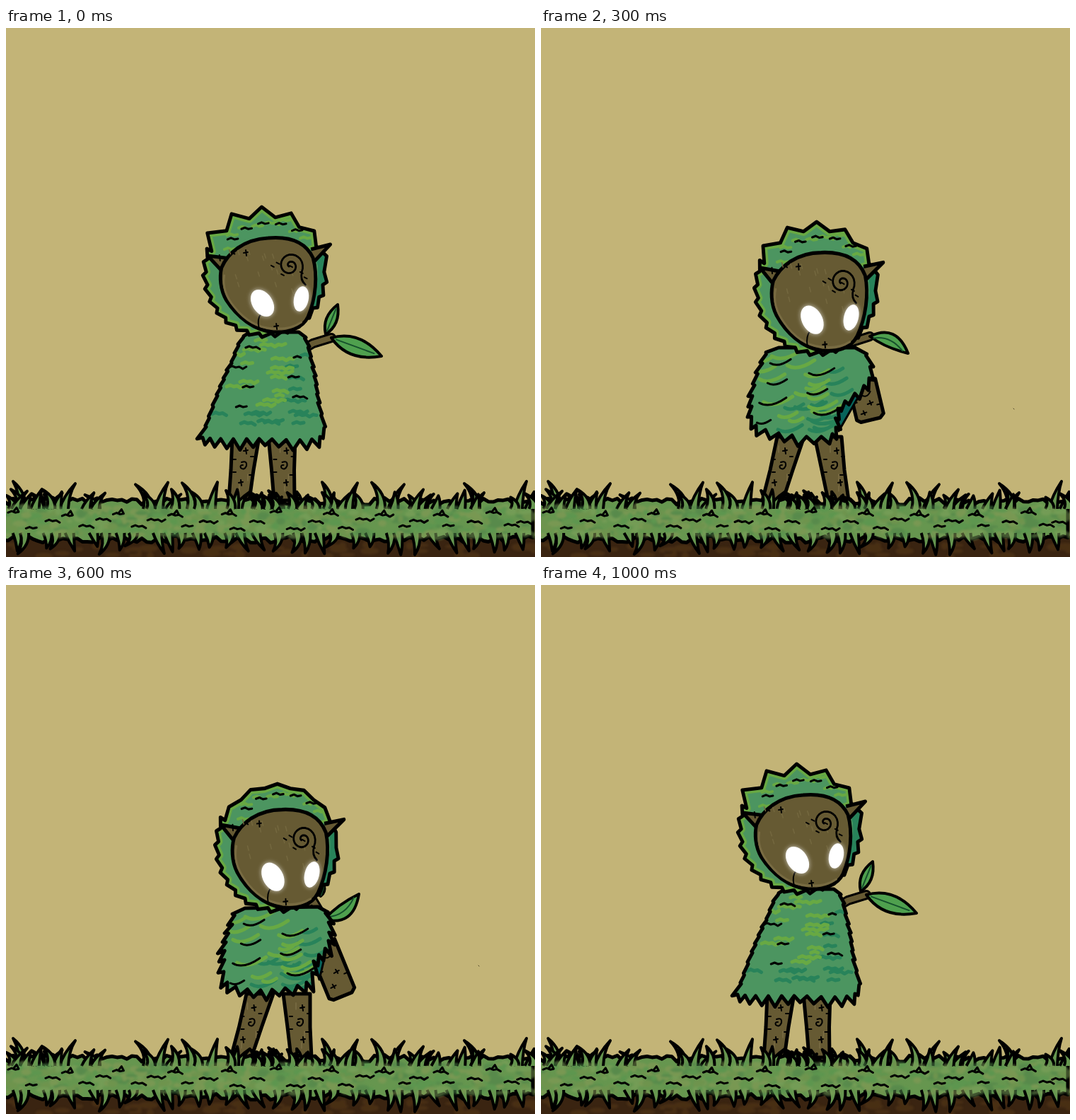
These frames come from a looping animation (748x748 px, 1.1 s). An HTML page:

```html
<!DOCTYPE html>
<html lang="en">
<head>
<meta charset="utf-8">
<title>Forest sprite</title>
<style>
html, body { margin: 0; width: 100%; height: 100%; overflow: hidden; background: #c3b477; }
svg { display: block; width: 100vw; height: 100vh; }
.ink { fill: none; stroke: #000; stroke-linecap: round; stroke-linejoin: round; }
.line { stroke: #000; stroke-linejoin: round; }
.pose { visibility: hidden; animation: show 1.1s step-end infinite; }
.rest { animation-name: rest; }
@keyframes show { 0% { visibility: visible; } 9.0909% { visibility: hidden; } }
@keyframes rest { 0% { visibility: visible; } 18.1818% { visibility: hidden; } }
</style>
</head>
<body>
<svg id="stage" viewBox="0 0 748 748"></svg>
<script>
const LIGHT = '#68a943', DARK = '#28835a', FUR = '#4c9560', BARK = '#665a33', TURF = '#66964f';

// Seeded random numbers
let seed = 1;
const rnd = (a, b) => {
  seed = (seed * 16807) % 2147483647;
  return a + (b - a) * seed / 2147483647;
};
const list = (n, f) => Array.from({ length: n }, (_, i) => f(i));
const times = (n, f) => list(n, f).join('');
const points = s => s.split(' ').map(p => p.split(',').map(Number));
const poly = p => 'M' + p.map(q => q.map(v => v.toFixed(1))).join(' ');

const stroke = (d, color = '#000', width = 2) =>
  `<path d="${d}" class="ink" style="stroke:${color};stroke-width:${width}"/>`;
const shape = (d, fill, width = 5) =>
  `<path d="${d}" class="line" fill="${fill}" stroke-width="${width}"/>`;
const cross = (x, y) => `M${x - 3},${y}l6,-1M${x},${y - 4}l1,8`;

// Ragged dash, or a windblown swoop
const dash = (x, y, w) => `M${x},${y}` + times(w / 5, i => `l5,${[-2, 2, -1, 3, -3, 1][i % 6]}`);
const swoop = (x, y, w) => `M${x},${y}q${w * .5},${w * .3} ${w * 1.3},${-w * .25}`;

let clips = 0;
const clipped = (d, fill, inner) => {
  const id = 'clip' + clips++;
  return `<clipPath id="${id}"><path d="${d}"/></clipPath><path d="${d}" fill="${fill}"/>
    <g clip-path="url(#${id})">${inner}</g>${shape(d, 'none')}`;
};

// Closed Catmull-Rom curve through p at position u
const spline = (p, u) => {
  const i = Math.floor(u), t = u - i;
  return [0, 1].map(c => {
    const [a, b, d, e] = [-1, 0, 1, 2].map(k => p[(i + k + p.length) % p.length][c]);
    return b + t / 2 * (d - a + t * (2 * a - 5 * b + 4 * d - e + t * (3 * (b - d) + e - a)));
  });
};

// Cape outline: left side down, hem, right side up, neck; teeth hang from all but the neck
const fringe = (p, tuft) => {
  const out = [];
  for (let i = 0; i < 9; i++) {
    const hem = i === 4 || i === 5, lean = hem ? .5 : i < 4 ? .75 : .2;
    const size = Math.hypot(p[i + 1][0] - p[i][0], p[i + 1][1] - p[i][1]);
    const n = Math.max(1, Math.round(size / (hem ? 17 : 14)));
    for (let k = 0; k < n; k++) {
      const u = i + (k + lean) / n;
      const [x, y] = spline(p, u), [x2, y2] = spline(p, u + .01);
      const h = Math.hypot(x2 - x, y2 - y), d = (hem ? 14 : tuft) * rnd(.6, 1.2);
      out.push(spline(p, i + k / n));
      out.push([x - (y2 - y) / h * d, y + (x2 - x) / h * d + (hem ? 0 : d * .8)]);
    }
  }
  return poly([...out, p[9]]) + 'Z';
};

const cape = (p, tuft) => {
  seed = 11;
  const d = fringe(p, tuft), mark = tuft > 5.5 ? swoop : dash;
  const cx = (p[2][0] + p[7][0]) / 2, top = p[0][1];
  const light = list(15, i => mark(cx + rnd(-60, 22), top + 12 + i * 6.5, rnd(14, 36)));
  const dark = list(14, i => i % 2
    ? mark(cx + rnd(20, 50), top + 25 + i * 8, rnd(15, 32))
    : mark(cx + rnd(-85, 40), p[5][1] - rnd(4, 42), rnd(18, 40)));
  const black = list(7, i => mark(cx + (i % 2 ? rnd(5, 40) : rnd(-60, -30)), top + 22 + i * 14, rnd(12, 30)));
  const lining = poly([p[8], p[7], [p[6][0] + tuft * 3 - 9, p[6][1] - 4]]) + 'Z';
  return shape(lining, '#07645b', 3) + clipped(d, FUR,
    stroke(dark.join(''), DARK, 5) + stroke(light.join(''), LIGHT, 5) + stroke(black.join(''), '#000', 3));
};

// Hood: an ellipse with big teeth on the crown and small ones round the sides
const hood = spike => {
  const at = (deg, r) => {
    const a = deg * Math.PI / 180;
    return [366 + 85 * r * Math.cos(a), 345 + (deg < 0 ? 80 : 87) * r * Math.sin(a)];
  };
  const crown = list(6, i => [at(-158 + i * 26, .98), at(-145 + i * 26, 1 + spike * (1.1 - i * .13))]).flat();
  const sides = list(17, i => [at(i * 12, 1), at(i * 12 + 9, 1.06)]).flat();
  const d = poly([...crown, ...sides]) + 'Z';
  seed = 5;
  const tufts = list(9, i => dash(...at(-150 + i * 15, rnd(.8, .95)), rnd(12, 24)));
  const marks = list(5, i => dash(...at(-138 + i * 20, .86), 16));
  return clipped(d, FUR, stroke(d, LIGHT, 12) + stroke(poly(list(9, i => at(-25 + i * 9, .98))), DARK, 14) +
    stroke(tufts.join(''), LIGHT, 4) + stroke(marks.join(''), '#000', 3));
};

seed = 23;
const specks = (n, w, h) => times(n, () => `M${rnd(314, 424)},${rnd(312, 372)}l${w},${h}`);
const spiral = poly(list(40, i => {
  const t = i / 39, a = .5 - t * 10.5, r = 19 - 17 * t;
  return [402 + r * Math.cos(a), 336 + r * Math.sin(a)];
}));
const eye = (x, y, rx, ry, turn) => ['filter="url(#glow)" opacity=".7"', ''].map(extra =>
  `<ellipse cx="${x}" cy="${y}" rx="${rx}" ry="${ry}" fill="#fff" transform="rotate(${turn} ${x} ${y})" ${extra}/>`).join('');
const face =
  shape('M316,326L283,322L303,343M432,313L460,306L437,330', BARK) +
  shape('M303,339C312,318 335,299 370,297C405,294 425,304 435,325C442,350 439,382 428,408C420,425 400,431 378,430C350,428 325,408 310,385C301,370 300,352 303,339Z', BARK) +
  stroke('M307,350Q303,373 322,395Q345,423 376,425Q402,427 418,416', '#786b42', 3) +
  stroke(specks(16, 2, 6), '#74683f', 1.5) + stroke(specks(7, 4, 2)) +
  stroke(spiral + 'M419,345Q416,356 424,363', '#000', 2.8) +
  stroke(cross(338, 318) + cross(300, 325) + cross(382, 422) + 'M360,404Q354,412 357,424') +
  eye(362, 389, 14.5, 21, -35) + eye(418, 383, 10.5, 18, 12);
const head = ([x, y, turn, tall, spike]) =>
  `<g transform="translate(${x},${y}) rotate(${turn}) scale(.98,${tall}) translate(-390,-386)">${hood(spike)}${face}</g>`;

const leg = (hip, foot) => {
  const x = (hip + foot) / 2;
  return shape(`M${hip - 20},578H${hip + 18}L${x + 15},625L${foot + 14},668H${foot - 15}L${x - 17},625Z`, BARK) +
    stroke(`M${x - 5},${600}v-9M${x + 7},640v-9M${foot},655v-8`, '#7b6e45', 1.5) +
    stroke(`M${x - 2},614q8,-3 7,5q-3,7 -8,3q-2,-4 3,-4` + cross(x + 4, 598) + cross(foot + 2, 643) +
      `M${x - 14},628h4M${x - 14},610h4M${x + 9},632h4M${x + 11},606h4`);
};

// Log from shoulder to hand
const arm = ([x, y, x2, y2]) => {
  const size = Math.hypot(x2 - x, y2 - y), turn = Math.atan2(y2 - y, x2 - x) * 180 / Math.PI;
  return `<g transform="translate(${x},${y}) rotate(${turn})">
    ${shape(`M-8,-19H${size - 5}L${size},-13V15L${size - 4},20H-8Z`, BARK)}
    ${stroke(cross(size * .5, -4) + cross(size * .75, 8) + `M8,-8q10,8 0,15M${size * .6},-18v5M${size * .4},19v-5`)}</g>`;
};

const leaf = (x, y, x2, y2, bow = 0) => {
  const dx = x2 - x, dy = y2 - y;
  const side = w => `${x + dx * .45 + dy * w},${y + dy * .45 - dx * w}`;
  return shape(`M${x},${y}Q${side(.32 + bow)} ${x2},${y2}Q${side(bow - .32)} ${x},${y}Z`, '#4fa04e', 4) +
    stroke(`M${x + dx * .1},${y + dy * .1}Q${side(bow)} ${x + dx * .85},${y + dy * .85}`, '#16502c');
};
const twig = (x, y) => {
  const d = `M424,452L434,446L${x},${y}`;
  return stroke(d, '#000', 14) + stroke(d, BARK, 8);
};

// Key poses. head: eye centre, turn, height, crown; legs: hip and foot twice;
// arm, sprig and leaf: base and tip (leaf also its bow); cape: ten points round the edge
const standing = {
  head: [390, 386, 0, 1, .18], legs: [340, 330, 391, 394], arm: [400, 490, 405, 530], tuft: 3,
  sprig: [452, 433, 469, 391], leaf: [460, 438, 531, 464, 0],
  cape: points('345,430 319,474 299,520 283,564 278,579 358,581 444,578 441,530 433,480 414,430')
};
const leaning = {
  head: [395, 395, -7.5, .97, .18], legs: [345, 328, 398, 398], arm: [400, 490, 405, 530], tuft: 4,
  sprig: [450, 436, 464, 391], leaf: [458, 436, 532, 459, 0],
  cape: points('338,446 317,464 299,496 282,536 277,572 350,580 434,582 438,540 436,490 418,440')
};
const wrapped = {
  head: [411, 411, 3, 1.04, .14], legs: [354, 328, 407, 421], arm: [456, 508, 467, 554], tuft: 6,
  sprig: [445, 440, 450, 425], leaf: [465, 436, 519, 460, .22],
  cape: points('336,452 313,474 302,505 298,535 304,562 355,576 412,574 420,538 464,495 444,452')
};
const blown = {
  head: [410, 415, 3, 1.04, .04], legs: [354, 331, 412, 419], arm: [458, 512, 509, 564], tuft: 9,
  sprig: [445, 445, 450, 430], leaf: [448, 458, 480, 408, -.25],
  cape: points('340,455 317,480 299,510 303,530 310,574 360,578 428,566 432,535 456,506 441,455')
};
const settling = {
  head: [405, 411, 3, 1.04, .04], legs: [360, 333, 412, 418], arm: [450, 515, 477, 581], tuft: 9,
  sprig: [445, 440, 450, 425], leaf: [450, 473, 499, 437, -.22],
  cape: points('338,457 320,480 311,505 309,530 313,562 360,573 425,562 435,532 456,503 441,455')
};
const returning = {
  head: [405, 409, 3, 1.04, .16], legs: [354, 328, 407, 421], arm: [440, 528, 444, 554], tuft: 5,
  sprig: [443, 440, 450, 425], leaf: [445, 450, 500, 478, .22],
  cape: points('338,450 316,475 299,505 292,530 300,565 355,579 422,578 427,545 464,520 440,455')
};

// Halfway between two poses
const mix = (a, b) => typeof a === 'number' ? (a + b) / 2
  : Array.isArray(a) ? a.map((v, i) => mix(v, b[i]))
  : Object.fromEntries(Object.keys(a).map(k => [k, mix(a[k], b[k])]));

const sprite = p => leg(p.legs[0], p.legs[1]) + leg(p.legs[2], p.legs[3]) + arm(p.arm) +
  twig(...p.leaf) + leaf(...p.sprig) + leaf(...p.leaf) + cape(p.cape, p.tuft) + head(p.head);

const poses = [
  standing, leaning, mix(leaning, wrapped), wrapped, mix(wrapped, blown), blown,
  settling, mix(settling, returning), returning, mix(returning, standing)
];
const actor = poses.map((p, i) =>
  `<g class="pose${i ? '' : ' rest'}" style="animation-delay:${i ? i * 100 - 1100 : -100}ms">
    ${sprite(p)}${i ? stroke('M668,538l1,1', '#443d20', 1) : ''}</g>`).join('');

// Grass: tall blades are mirrored about the middle, short ones scattered
seed = 42;
const blade = (x, tip, y, root = 680) =>
  shape(`M${x - 6},${root}Q${x - 1},${(y + root) / 2} ${tip},${y}Q${x + 7},${y * .6 + root * .4} ${x + 6},${root}`, TURF, 4);
const tall = points('22,10 82,98 200,183 216,229 262,249 290,299').map(([x, tip]) => {
  const y = rnd(641, 647);
  return blade(x, tip, y) + blade(746 - x, 746 - tip, y);
}).join('');
const short = (n, from, to) => times(n, () => {
  const x = rnd(from, to);
  return blade(x, x + rnd(-17, 17), rnd(652, 664));
});
const hanging = times(34, i => {
  const x = i * 22 + rnd(0, 16);
  return blade(x, x + rnd(-12, 12), rnd(732, 746), 714);
});
const edge = (y, amp) => list(108, i => [i * 7 - 4, rnd(y - amp, y + amp)]);
const turf = poly([...edge(669, 5), ...edge(723, 5).reverse()]) + 'Z';
const blots = (n, y, y2, size, colors) => `<g filter="url(#soft)" opacity=".55">` + times(n, i =>
  `<ellipse cx="${rnd(0, 748)}" cy="${rnd(y, y2)}" rx="${rnd(3, size)}" ry="${rnd(2, 6)}" fill="${colors[i % colors.length]}"/>`) + '</g>';
const marks = times(30, i => {
  const x = i * 25 + rnd(-8, 8), y = [687, 706, 697][i % 3] + rnd(-3, 3);
  return dash(x, y, rnd(15, 30)) + (i % 3 ? '' : `M${x + 8},${y - 2}l4,-5 3,6`);
});
const ground = `
  <rect y="718" width="748" height="30" fill="#3a2411"/>${blots(50, 730, 748, 14, ['#543818'])}
  ${clipped(turf, TURF, '')}${tall}${short(46, 0, 748)}${short(14, 318, 440)}${hanging}
  ${blots(420, 677, 719, 11, ['#889a57', '#56964f', '#7fa25b', '#4d8249', '#74934e'])}
  ${stroke(marks, '#000', 3)}`;

document.getElementById('stage').innerHTML = `
  <defs>
    <filter id="glow" x="-50%" y="-50%" width="200%" height="200%"><feGaussianBlur stdDeviation="3"/></filter>
    <filter id="soft"><feGaussianBlur stdDeviation="1.4"/></filter>
  </defs>
  <rect width="748" height="748" fill="#c3b477"/>${actor}${ground}`;
</script>
</body>
</html>
```
